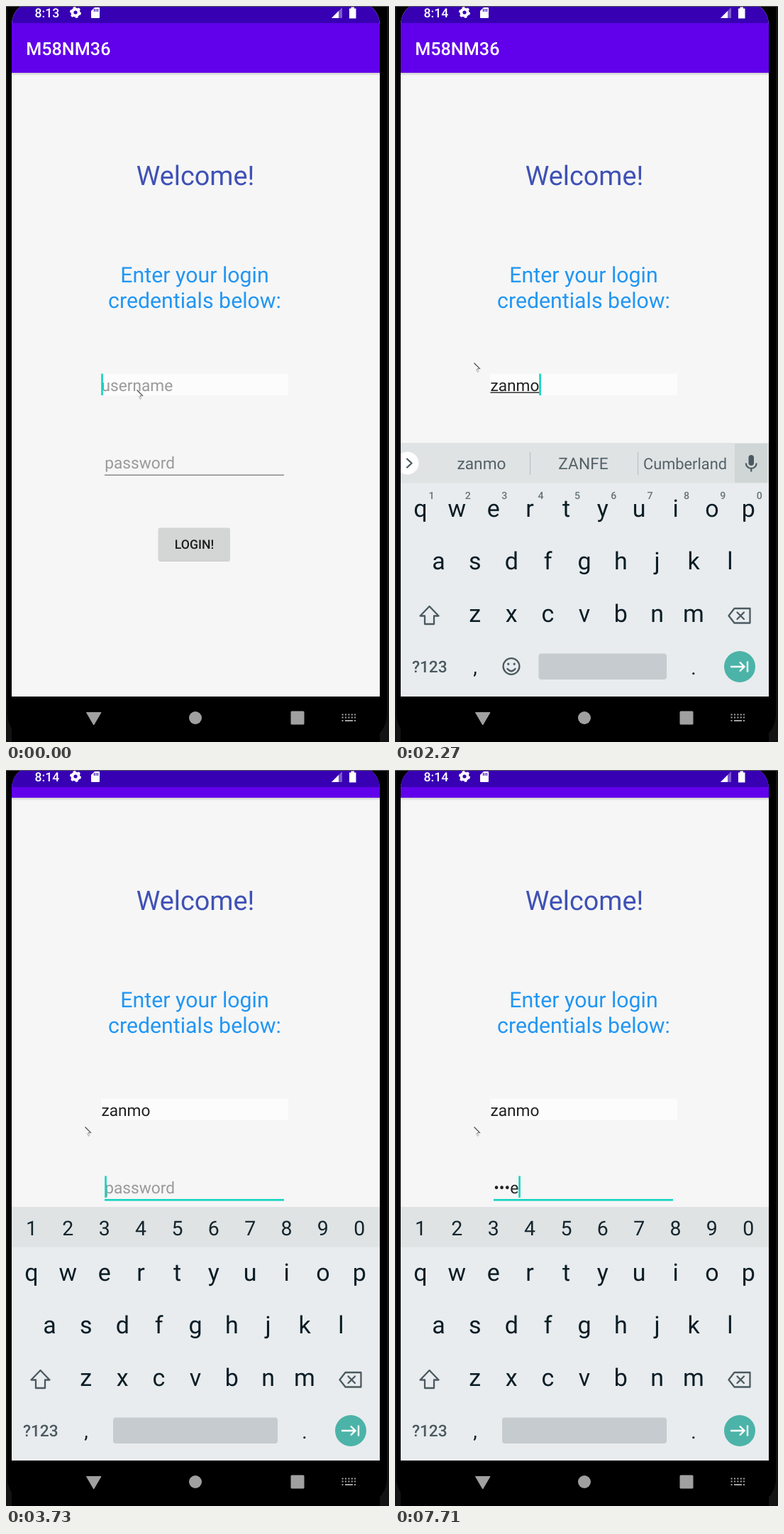
Recreate the animation shown at these times as an HTML page. Size 540 px wide and 1036 px high, loop 8000 ms.

```html
<!DOCTYPE html>
<html lang="en">
<head>
<meta charset="utf-8">
<title>Login screen</title>
<style>
html, body { margin: 0; width: 100%; height: 100%; overflow: hidden; background: #000; }
svg { display: block; width: 540px; height: 1036px; font-family: Roboto, sans-serif; text-rendering: geometricPrecision; }
.mid { text-anchor: middle; }
.field { font-size: 22.72px; }
.medium { font-weight: 500; }
.icon { fill: none; stroke: #4b5960; stroke-width: 2.3; stroke-linejoin: round; stroke-linecap: round; }
</style>
</head>
<body>
<svg viewBox="0 0 540 1036" xmlns="http://www.w3.org/2000/svg">
  <defs>
    <clipPath id="screen"><path d="M8 1036V26Q9 8 22 0H513Q526 8 527 26V1036Z"/></clipPath>
    <linearGradient id="shade" x2="0" y2="1">
      <stop offset="0" stop-color="#000" stop-opacity=".18"/>
      <stop offset="1" stop-color="#000" stop-opacity="0"/>
    </linearGradient>
  </defs>

  <rect width="540" height="1036" fill="#131313"/>
  <path d="M2 0H537V1000Q535 1025 508 1036H34Q5 1025 2 1000Z"/>

  <g clip-path="url(#screen)">
    <rect x="8" width="519" height="972" fill="#f6f6f6"/>
    <g id="form">
      <rect x="8" y="24" width="519" height="70" fill="#6100ea"/>
      <rect x="8" y="94" width="519" height="4" fill="url(#shade)"/>
      <text x="28.2" y="69" class="medium" font-size="25.2" fill="#fff">M58NM36</text>
      <text x="267" y="252" class="mid" font-size="37.86" fill="#3f51b5">Welcome!</text>
      <g class="mid" font-size="30.3" fill="#2196f3">
        <text x="266" y="389">Enter your login</text>
        <text x="266" y="425">credentials below:</text>
      </g>
      <rect x="134" y="517.5" width="264" height="30.5" fill="#fcfcfc"/>
      <text id="user" class="field" x="134.4" y="542"></text>
      <rect id="composing" x="134.4" y="543.4" height="1.4" fill="#222"/>
      <text id="pass" class="field" x="139.2" y="651"></text>
      <rect id="underline" x="139" width="253"/>
      <rect id="caret" width="2.6" height="30.5" fill="#10d3c0"/>
      <rect x="215" y="736" width="101" height="46" rx="3" fill="#000" opacity=".16"/>
      <rect x="214.5" y="734.5" width="101.5" height="46" rx="2.5" fill="#d4d6d5"/>
      <text x="265.5" y="764" class="mid medium" font-size="17.67" fill="#1c1c1c">LOGIN!</text>
    </g>

    <rect x="8" width="519" height="24" fill="#3700b3"/>
    <text id="clock" x="40.5" y="16" class="medium" font-size="17.67" fill="#fff"></text>
    <circle cx="98" cy="9" r="4.6" fill="none" stroke="#fff" stroke-width="4"/>
    <circle cx="98" cy="9" r="7" fill="none" stroke="#fff" stroke-width="2" stroke-dasharray="3.66"/>
    <path d="M125 2H131Q132 2 132 3V16Q132 17 131 17H121Q120 17 120 16V7Z" fill="#fff"/>
    <path d="M124.5 4V8M127 4V8M129.5 4V8" stroke="#3700b3" stroke-width="1.2"/>
    <path d="M474 2V17H459Z" fill="#fff" opacity=".35"/>
    <path d="M469 7V17H459Z" fill="#fff"/>
    <path d="M484 3.5H486.5V1.5H491V3.5H493.5V17.5H484Z" fill="#fff"/>

    <rect x="8" y="972" width="519" height="64"/>
    <g fill="#a0a0a0" stroke="#a0a0a0" stroke-width="0">
      <path d="M113.500 994.500H134L123.700 1012Z" stroke-width="1" stroke-linejoin="round"/>
      <circle cx="267" cy="1002" r="9"/>
      <rect x="401.500" y="992.500" width="19" height="19" rx="1.500"/>
      <path d="M473.500 997.500H493M473.500 1001.500H493" stroke-width="2.200" stroke-dasharray="2.200"/>
      <path d="M478 1006H489M473.500 1006H475.500M491 1006H493" stroke-width="2.200"/>
    </g>

    <g id="keyboard">
      <rect x="8" y="615" width="519" height="357" fill="#e8ecee"/>
      <rect x="8" y="615" width="519" height="56.500" fill="#dfe3e4"/>
      <g id="suggestions">
        <circle cx="17.500" cy="643.500" r="16" fill="#fff"/>
        <path class="icon" d="M17 637.500L23.500 643.500L17 649.500"/>
        <path d="M190.500 628V660M342.500 628V660" stroke="#bcc2c4" stroke-width="1.300"/>
        <g id="words" class="mid" font-size="22.720" fill="#556168"></g>
        <rect x="479" y="616" width="46" height="55" fill="#d0d5d6"/>
        <rect x="498.500" y="632" width="7.500" height="15" rx="3.750" fill="#4b5960"/>
        <path d="M494.800 643.500a7.450 7.450 0 0 0 14.900 0M502.250 651V655.500" fill="none" stroke="#4b5960" stroke-width="2.200"/>
      </g>
      <g id="hints" class="mid medium" font-size="14.200" fill="#66737a"></g>
      <g id="digits" class="mid" font-size="28.500" fill="#15252d"></g>
      <g id="letters" class="mid" font-size="34" fill="#0b1d26"></g>
      <g id="marks" class="mid" font-size="28" fill="#0b1d26"></g>
      <path class="icon" d="M48.500 845L61.500 858.500H55V870H42V858.500H35.500Z" stroke-linejoin="miter"/>
      <path class="icon" d="M478.500 848H500.500V868.500H478.500L470.500 858.250Z"/>
      <path class="icon" d="M482.500 853.500L492 863M492 853.500L482.500 863"/>
      <text x="48.800" y="938" class="mid medium" font-size="22.700" fill="#4b5960">?123</text>
      <g id="smiley" class="icon">
        <circle cx="164" cy="929.500" r="11.400"/>
        <path d="M158.500 933Q164 939.500 169.500 933"/>
        <path d="M159.800 926V926.300M168.200 926V926.300" stroke-width="3.200"/>
      </g>
      <rect id="space" y="911.500" height="36.500" rx="4" fill="#c5cbce"/>
      <circle cx="486" cy="930" r="22" fill="#4cb3a8"/>
      <path d="M473 930H492M486 923.500L492.500 930L486 936.500M497 922.500V937.500" fill="none" stroke="#fff" stroke-width="2.400"/>
    </g>

    <g id="mouse" fill="none">
      <path d="M.5 .5L9 9" stroke="#444" stroke-width="1.100"/>
      <path d="M5 8.500H8.500M3.500 9.500L5.500 13.500M5.500 9L7 12.500" stroke="#777" stroke-width=".9" stroke-dasharray="2 .8"/>
    </g>
  </g>
  <rect width="540" height="1" fill="#555"/>
</svg>

<script>
const LOOP = 8000, NAME = "zanmo";
const $ = id => document.getElementById(id);
const set = (id, attrs) => {
  for (const key in attrs) $(id).setAttribute(key, attrs[key]);
};
const show = (id, on) => $(id).setAttribute("visibility", on ? "inherit" : "hidden");

// Value of the latest [time, value] pair already reached.
const at = (steps, t) => steps.reduce((value, step) => t >= step[0] ? step[1] : value, steps[0][1]);

function label(parent, text, x, y) {
  const node = document.createElementNS("http://www.w3.org/2000/svg", "text");
  node.setAttribute("x", x);
  node.setAttribute("y", y);
  node.textContent = text;
  $(parent).append(node);
}
function row(parent, chars, x, y) {
  [...chars].forEach((char, i) => label(parent, char, x + i * 51.36, y));
}

row("letters", "qwertyuiop", 36, 719);
row("letters", "asdfghjkl", 61.5, 793);
row("letters", "zxcvbnm", 112.8, 867);
label("marks", ",", 113, 940);
label("marks", ".", 421, 941);
row("hints", "1234567890", 51.5, 694);
row("digits", "1234567890", 36, 655);
[122, 265.5, 409].forEach(x => label("words", "", x, 652));

const typed = [[0, 0], [150, 2], [550, 3], [670, 4], [1210, 5]];
const secret = [[0, ""], [5810, "s"], [6780, "•t"], [7590, "••a"], [7710, "•••e"]];
const caretOn = [[0, 1], [1060, 0], [1210, 1], [1750, 0], [2270, 1], [4320, 0], [4750, 1],
  [5210, 0], [5810, 1], [6190, 0], [6780, 1], [7310, 0], [7590, 1]];
const scroll = [[0, 0], [2640, -45.2], [2760, -54], [2910, -54.5], [3730, -55]];
const mousePath = [[0, [184, 540]], [1750, [145, 644]], [1890, [126, 734]],
  [2030, [119, 650]], [2150, [113, 540]], [2270, [111, 502]]];
const wordSets = [[0, ["zan", "ZAN", "cause"]], [670, ["zanm", "ZANM", "cause"]],
  [1210, [NAME, "ZANFE", "Cumberland"]]];

function entry(id, value, hint) {
  $(id).textContent = value || hint;
  $(id).setAttribute("fill", value ? "#222" : "#9a9a9a");
  return value ? $(id).getComputedTextLength() : 0;
}

function draw(t) {
  const onPassword = t >= 2640, numeric = t >= 2760, rising = t < 670;
  const userWidth = entry("user", NAME.slice(0, at(typed, t)), "username");
  const passWidth = entry("pass", at(secret, t), "password");

  set("form", { transform: `translate(0 ${at(scroll, t)})` });
  set("composing", { width: onPassword ? 0 : userWidth });
  set("underline", onPassword
    ? { y: 658.9, height: 2.6, fill: "#10d3c0" }
    : { y: 659.6, height: 1.3, fill: "#7b7b7b" });
  set("caret", onPassword
    ? { x: 139.2 + passWidth, y: 626.5 }
    : { x: 134.2 + userWidth, y: 517.5 });
  show("caret", at(caretOn, t));
  $("clock").textContent = t < 1890 ? "8:13" : "8:14";

  show("keyboard", t >= 550);
  set("keyboard", { transform: `translate(0 ${rising ? 6 : 0})`, opacity: rising ? 0.87 : 1 });
  for (const id of ["suggestions", "hints", "smiley"]) show(id, !numeric);
  show("digits", numeric);
  set("space", numeric ? { x: 151, width: 232 } : { x: 202.5, width: 180.5 });
  at(wordSets, t).forEach((word, i) => {
    const node = $("words").children[i];
    node.textContent = word;
    node.setAttribute("font-size", word.length > 8 ? 21.8 : 22.72);
  });
  set("mouse", { transform: `translate(${at(mousePath, t)})` });
}

const start = performance.now();
function tick() {
  draw((performance.now() - start) % LOOP);
  requestAnimationFrame(tick);
}
tick();
</script>
</body>
</html>
```
